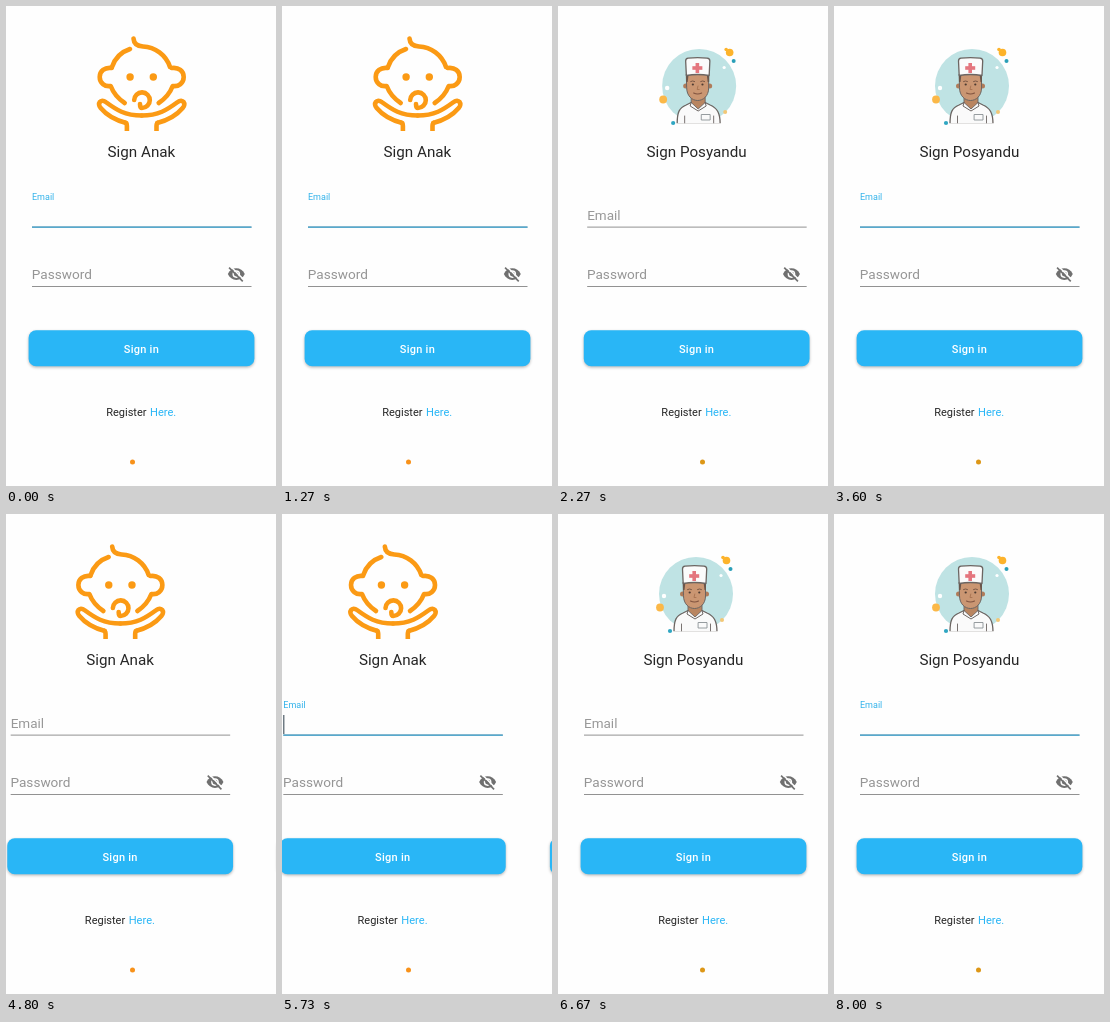
Animation, 270 px wide and 480 px high, one loop 8.07 s. Source, as an HTML page with a canvas:

```html
<!DOCTYPE html>
<html lang="id">
<head>
<meta charset="utf-8">
<title>Sign in</title>
<style>
html, body { margin: 0; width: 100%; height: 100%; overflow: hidden; background: #fefefe; }
canvas { display: block; width: 270px; height: 480px; }
</style>
</head>
<body>
<canvas id="stage"></canvas>
<script>
const W = 270, H = 480, LOOP = 8070;
const BG = '#fefefe', BLUE = '#29b6f6', ORANGE = '#fb9a14', INK = '#262626';
const canvas = document.getElementById('stage');
const ctx = canvas.getContext('2d');
const dpr = window.devicePixelRatio || 1;
canvas.width = W * dpr;
canvas.height = H * dpr;

// Swipes: start time and direction
const SWIPES = [[1464, 1], [4278, -1], [5668, 1]];
const FOCUS_MS = 170;
// Times at which focus jumps to the other page
const FOCUS = [2690, 5400, 6690];

const clamp = (v) => Math.max(0, Math.min(1, v));
const mix = (a, b, p) => a + (b - a) * p;

// Critically damped spring from 0 to 1
function spring(ms) {
  if (ms <= 0) return 0;
  if (ms > 940) return 1;
  const x = ms * 0.008;
  return 1 - (1 + x) * Math.exp(-x);
}

function scrollAt(t) {
  return SWIPES.reduce((sum, [start, dir]) => sum + dir * spring(t - start), 0);
}

// How far the Email field of a page is focused, 0 to 1
function focusAt(t, page) {
  let p = 0;
  FOCUS.forEach((start, i) => {
    const e = clamp((t - start) / FOCUS_MS);
    p += (i % 2 ? -1 : 1) * e * e * (3 - 2 * e);
  });
  return page ? p : 1 - p;
}

function cursorOn(t) {
  return t >= 400 && t < 8000 && Math.floor(t / 400) % 2 === 0;
}

function text(str, x, y, size, color, align = 'left', weight = 400, spacing = '0px') {
  ctx.font = `${weight} ${size}px Roboto, sans-serif`;
  ctx.letterSpacing = spacing;
  ctx.textAlign = align;
  ctx.fillStyle = color;
  ctx.fillText(str, x, y);
}

function disc(x, y, r, color) {
  ctx.fillStyle = color;
  ctx.beginPath();
  ctx.arc(x, y, r, 0, 7);
  ctx.fill();
}

function stroke(d, color, width) {
  ctx.strokeStyle = color;
  ctx.lineWidth = width;
  ctx.stroke(new Path2D(d));
}

function shape(d, fill, line, width = 1.2) {
  ctx.fillStyle = fill;
  ctx.fill(new Path2D(d));
  if (line) stroke(d, line, width);
}

function baby() {
  ctx.lineCap = ctx.lineJoin = 'round';
  const line = (d) => stroke(d, ORANGE, 4.6);
  line('M127.5 32.5 Q128 40 137 40.5 C149 41 160 49 164 61');
  line('M124 43 C115 46 109 52 106 61');
  for (const side of [1, -1]) {
    ctx.save();
    ctx.translate(135.7, 0);
    ctx.scale(side, 1);
    line('M-30 62 C-37 61 -42 65 -42 71 C-42 77 -37 81 -31 80 C-28 88 -23 93 -17 97');
    line('M0 109.5 C-17 109.5 -25 104 -36 96 C-41 92 -45 98 -41 102 C-36 108 -27 114 -15.5 117');
    ctx.lineCap = 'butt';
    line('M-17 116.5 Q-14.8 117 -14.8 120 V125');
    ctx.lineCap = 'round';
    disc(-11.6, 71, 3.7, ORANGE);
    ctx.restore();
  }
  line('M128.2 94 A7.8 7.8 0 1 1 136 102 Q134 102 134 98');
}

function nurse() {
  const dark = '#6b6562', skin = '#ca9672';
  ctx.lineCap = ctx.lineJoin = 'round';
  disc(138, 80, 37, '#bfe3e4');
  disc(168.5, 46.5, 3.8, '#fdb32b');
  disc(165, 43.5, 1.8, '#fdb32b');
  disc(172.5, 55, 2, '#2a9fb8');
  disc(102, 93.5, 3.9, '#fbb848');
  disc(164, 106, 2, '#f3c775');
  disc(112, 117, 2.1, '#2fa6c2');
  disc(106, 82, 2.2, '#fff');
  disc(163, 61.5, 1.6, '#fff');

  ctx.save();
  ctx.beginPath();
  ctx.rect(100, 40, 76, 77.3);
  ctx.clip();
  shape('M116 118 C116 106 118 102 125 99 L132 95.5 H142 L149 99 C156 102 159 107 159 118 Z', '#fafafa', dark, 1.3);
  shape('M130 90 V96.5 L137 103 L144 96.5 V90 Z', '#b98560', dark, 0.9);
  stroke('M130 96.5 L129 100 L137 105 L145 100 L144 96.5', dark, 1);
  stroke('M123.5 110 V118 M152.5 110 V118', dark, 0.9);
  stroke('M140.5 108.5 H149 V114 H140.5 Z', '#8c9296', 0.9);
  ctx.restore();

  disc(124.5, 80, 2.5, '#b07c5a');
  disc(148.5, 80, 2.5, '#b07c5a');
  shape('M125.5 68 H147.5 V82 C147.5 90 142 94.5 136.5 94.5 C131 94.5 125.5 90 125.5 82 Z', skin, dark, 1);
  shape('M125 68 H127.5 L126.5 76 H125 Z M145.5 68 H148 V76 H146.5 Z', '#6a564b');
  stroke('M129.5 75.5 Q131.5 74.3 133.5 75.5 M139.5 75.5 Q141.5 74.3 143.5 75.5', '#7a5846', 1);
  disc(131.7, 78.5, 1.1, '#4d3b32');
  disc(141.3, 78.5, 1.1, '#4d3b32');
  stroke('M136.8 80 L136 83.5 H138', '#a87351', 0.9);
  stroke('M132.5 87 Q136.5 89 140.5 87', '#80533f', 1.1);
  shape('M124.5 55 Q124.5 52.5 127 52.2 Q136.5 51 146 52.2 Q148.7 52.5 148.7 55 L148 69.5 Q136.5 67.5 125.2 69.5 Z', '#fbfbfb', dark, 1.3);
  ctx.fillStyle = '#e4767e';
  ctx.fillRect(134.4, 57, 3.6, 10);
  ctx.fillRect(131.2, 60.2, 10, 3.6);
}

function eyeOff() {
  ctx.save();
  ctx.translate(230.3, 268.1);
  ctx.scale(0.77, 0.77);
  ctx.lineCap = 'butt';
  shape('M-11 0 C-7 -10 7 -10 11 0 C7 10 -7 10 -11 0 Z', '#707070');
  disc(0, 0, 5, BG);
  disc(0, 0, 3.2, '#707070');
  stroke('M-8 -10.5 L10.5 8', BG, 2.2);
  stroke('M-9.4 -8.4 L8.4 9.4', '#707070', 2.1);
  ctx.restore();
}

function rule(y, height, color) {
  ctx.fillStyle = color;
  ctx.fillRect(26, y, 219.5, height);
}

function emailField(focus, cursor) {
  const grey = [152, 152, 152], tint = [50, 178, 234];
  const color = `rgb(${grey.map((g, i) => Math.round(mix(g, tint[i], focus)))})`;
  text('Email', 26, mix(214.2, 194, focus), mix(13.5, 9, focus), color);
  rule(220.6, 1, '#929292');
  if (focus > 0) {
    ctx.globalAlpha = focus;
    rule(220.4, 1.5, '#4ea8d0');
    ctx.globalAlpha = 1;
  }
  if (cursor) {
    ctx.fillStyle = '#5c6a74';
    ctx.fillRect(25.8, 201, 1.3, 19);
  }
}

function button() {
  ctx.save();
  ctx.shadowColor = 'rgba(0,0,0,0.28)';
  ctx.shadowBlur = 3 * dpr;
  ctx.shadowOffsetY = 1.2 * dpr;
  ctx.fillStyle = BLUE;
  ctx.beginPath();
  ctx.roundRect(22.6, 324.2, 225.8, 36, 7.5);
  ctx.fill();
  ctx.restore();
  text('Sign in', 135.4, 346.5, 11, '#fff', 'center', 500, '0.25px');
}

function page(index, t) {
  const focus = focusAt(t, index);
  if (index) nurse(); else baby();
  text(index ? 'Sign Posyandu' : 'Sign Anak', 135.4, 151, 15.2, INK, 'center');
  emailField(focus, focus > 0.5 && cursorOn(t));
  text('Password', 25.8, 273, 13.6, '#959595');
  rule(280, 1, '#929292');
  eyeOff();
  button();
  text('Register', 100.2, 410, 11, INK);
  text('Here.', 144, 410, 11.1, BLUE);
}

function draw(t) {
  const scroll = scrollAt(t);
  ctx.setTransform(dpr, 0, 0, dpr, 0, 0);
  ctx.fillStyle = BG;
  ctx.fillRect(0, 0, W, H);
  for (const index of [0, 1]) {
    const x = (index - scroll) * W;
    if (Math.abs(x) >= W) continue;
    ctx.save();
    ctx.translate(x, 0);
    page(index, t);
    ctx.restore();
  }
  if (scroll < 0.5) disc(126.5, 456, 2.5, '#f8921a');
  else disc(144.5, 456, 2.5, '#dd9717');
}

const begin = performance.now();
function tick() {
  draw((performance.now() - begin) % LOOP);
  requestAnimationFrame(tick);
}
tick();
</script>
</body>
</html>
```
